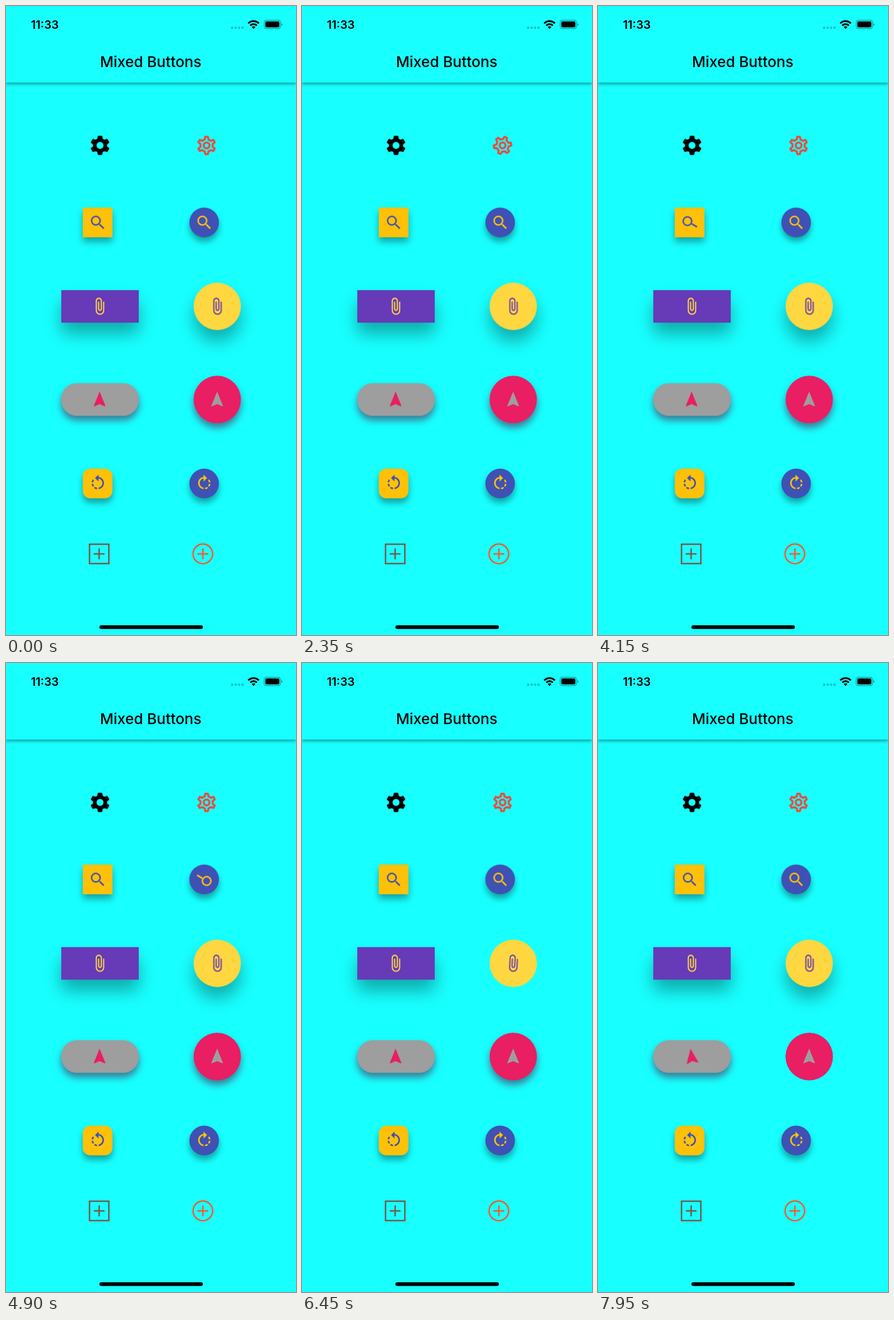
An HTML page that plays this animation: 509 px wide and 1101 px high, repeating every 8000 ms.

```html
<!DOCTYPE html>
<html lang="en">
<head>
<meta charset="utf-8">
<title>Mixed Buttons</title>
<style>
  html, body { margin: 0; width: 100%; height: 100%; overflow: hidden; background: #18ffff; }
  .stage { position: relative; width: 509px; height: 1101px; overflow: hidden; }
  .bar { position: absolute; inset: 0 0 auto; height: 134px; background: #18ffff; box-shadow: 0 3px 5px rgba(0, 0, 0, .36); }
  .chrome { position: absolute; inset: 0; font-family: Inter, Roboto, sans-serif; }

  /* --x and --y are the button centre */
  .btn {
    position: absolute; display: grid; place-items: center;
    left: calc(var(--x) * 1px); top: calc(var(--y) * 1px);
    width: var(--w); height: var(--h, var(--w));
    transform: translate(-50%, -50%);
    background: var(--bg, none); color: var(--fg);
  }
  .btn svg { width: var(--icon, 32.57px); height: var(--icon, 32.57px); overflow: visible; fill: currentColor; }
  .gear { --w: 40.7px; --icon: 40.7px; }
  .small { --w: 52.4px; }
  .disc { --w: 83.4px; }
  .wide { --w: 136px; --h: 57.4px; }
  .round { border-radius: 50%; }
  .low { --shade: rgba(0, 0, 0, .36); box-shadow: 0 8px 12px var(--shade); }
  .mid { --shade: rgba(85, 15, 65, .55); box-shadow: 0 8px 13px var(--shade); }
  .high { --shade: rgba(0, 0, 0, .33); box-shadow: 0 20px 30px var(--shade); }

  .press { animation: press 8s var(--down) infinite cubic-bezier(.4, 0, .2, 1); }
  .hold { animation: hold 8s infinite cubic-bezier(.4, 0, .2, 1); }
  .spin { animation: spin 8s var(--go) infinite ease-in-out; }
  @keyframes press {
    3%, 6.15% { box-shadow: 0 0 0 var(--shade); }
    8.9% { box-shadow: revert-layer; }
  }
  .low.press { animation-name: press-low; }
  .mid.press { animation-name: press-mid; }
  .high.press { animation-name: press-high; }
  @keyframes press-low {
    0%, 8.9%, 100% { box-shadow: 0 8px 12px var(--shade); }
    3%, 6.15% { box-shadow: 0 0 0 var(--shade); }
  }
  @keyframes press-mid {
    0%, 8.9%, 100% { box-shadow: 0 8px 13px var(--shade); }
    3%, 6.15% { box-shadow: 0 0 0 var(--shade); }
  }
  @keyframes press-high {
    0%, 8.9%, 100% { box-shadow: 0 20px 30px var(--shade); }
    3%, 6.15% { box-shadow: 0 0 0 var(--shade); }
  }
  @keyframes hold {
    0%, 97% { box-shadow: 0 8px 13px var(--shade); }
    100% { box-shadow: 0 0 0 var(--shade); }
  }
  @keyframes spin {
    0% { transform: rotate(0); }
    8.125%, 100% { transform: rotate(360deg); }
  }
</style>
</head>
<body>
<svg width="0" height="0" style="position:absolute">
  <defs>
    <path id="cog" stroke="currentColor" stroke-width="2" stroke-linejoin="round" d="M-1.85-6.25L-1.45-9H1.45L1.85-6.25 4.49-4.73 7.07-5.76 8.52-3.24 6.34-1.52V1.52L8.52 3.24 7.07 5.76 4.49 4.73 1.85 6.25 1.45 9H-1.45L-1.85 6.25-4.49 4.73-7.07 5.76-8.52 3.24-6.34 1.52V-1.52L-8.52-3.24-7.07-5.76-4.49-4.73z"/>
    <symbol id="search" viewBox="0 0 24 24"><path d="M15.5 14h-.79l-.28-.27A6.471 6.471 0 0 0 16 9.5 6.5 6.5 0 1 0 9.5 16c1.61 0 3.09-.59 4.23-1.57l.27.28v.79l5 4.99L20.49 19l-4.99-5zm-6 0C7.01 14 5 11.99 5 9.5S7.01 5 9.5 5 14 7.01 14 9.5 11.99 14 9.5 14z"/></symbol>
    <symbol id="clip" viewBox="0 0 24 24"><path d="M16.5 6v11.5c0 2.21-1.79 4-4 4s-4-1.79-4-4V5c0-1.38 1.12-2.5 2.5-2.5s2.5 1.12 2.5 2.5v10.5c0 .55-.45 1-1 1s-1-.45-1-1V6H10v9.5c0 1.38 1.12 2.5 2.5 2.5s2.5-1.12 2.5-2.5V5c0-2.21-1.79-4-4-4S7 2.79 7 5v12.5c0 3.04 2.46 5.5 5.5 5.5s5.5-2.46 5.5-5.5V6z"/></symbol>
    <symbol id="arrow" viewBox="0 0 24 24"><path d="M12 2L4.5 20.29l.71.71L12 18l6.79 3 .71-.71z"/></symbol>
    <symbol id="turn" viewBox="0 0 24 24"><path d="M7.11 8.53L5.7 7.11C4.8 8.27 4.24 9.61 4.07 11h2.02c.14-.87.49-1.72 1.02-2.47zM6.09 13H4.07c.17 1.39.72 2.73 1.62 3.89l1.41-1.42c-.52-.75-.87-1.59-1.01-2.47zm1.01 5.32c1.16.9 2.51 1.44 3.9 1.61V17.9c-.87-.15-1.71-.49-2.46-1.03L7.1 18.32zM13 4.07V1L8.45 5.55 13 10V6.09c2.84.48 5 2.94 5 5.91s-2.16 5.43-5 5.91v2.02c3.95-.49 7-3.85 7-7.93s-3.05-7.44-7-7.93z"/></symbol>
    <mask id="hub"><rect x="-12" y="-12" width="24" height="24" fill="#fff"/><circle r="3.6"/></mask>
  </defs>
</svg>

<div class="stage">
  <div class="bar"></div>

  <div class="btn gear" style="--x:165;--y:243.5;--fg:#000;--go:1390ms">
    <svg class="spin" viewBox="-12 -12 24 24"><use href="#cog" mask="url(#hub)"/></svg>
  </div>
  <div class="btn gear" style="--x:352;--y:243.5;--fg:#f44336;--go:2240ms">
    <svg class="spin" viewBox="-12 -12 24 24" style="fill:none"><use href="#cog"/><circle r="3" stroke="currentColor" stroke-width="2"/></svg>
  </div>

  <div class="btn small low press" style="--x:160.8;--y:379;--bg:#ffc107;--fg:#3f51b5;--down:3130ms;--go:3590ms">
    <svg class="spin"><use href="#search"/></svg>
  </div>
  <div class="btn small round low press" style="--x:348;--y:379;--bg:#3f51b5;--fg:#ffc107;--down:4110ms;--go:4590ms">
    <svg class="spin"><use href="#search"/></svg>
  </div>

  <div class="btn wide high press" style="--x:164.5;--y:526;--bg:#673ab7;--fg:#ffd740;--down:5060ms;--go:5505ms">
    <svg class="spin"><use href="#clip"/></svg>
  </div>
  <div class="btn disc round high press" style="--x:370.8;--y:526;--bg:#ffd740;--fg:#673ab7;--down:5960ms;--go:6405ms">
    <svg class="spin"><use href="#clip"/></svg>
  </div>

  <div class="btn wide mid press" style="--x:164.5;--y:688.5;--bg:#9e9e9e;--fg:#e91e63;--down:6940ms;--go:7370ms;border-radius:27px">
    <svg class="spin"><use href="#arrow"/></svg>
  </div>
  <div class="btn disc round mid hold" style="--x:370.8;--y:688.5;--bg:#e91e63;--fg:#9e9e9e">
    <svg><use href="#arrow"/></svg>
  </div>

  <div class="btn small low" style="--x:160.8;--y:835.5;--bg:#ffc107;--fg:#3f51b5;border-radius:13px">
    <svg><use href="#turn"/></svg>
  </div>
  <div class="btn small round low" style="--x:348;--y:835.5;--bg:#3f51b5;--fg:#ffc107">
    <svg style="transform:scaleX(-1)"><use href="#turn"/></svg>
  </div>

  <svg class="chrome" width="509" height="1101" viewBox="0 0 509 1101">
    <text x="68" y="40" font-size="20" font-weight="600" text-anchor="middle">11:33</text>
    <text x="254" y="107" font-size="26" font-weight="500" text-anchor="middle">Mixed Buttons</text>
    <g fill="#000" fill-opacity=".22">
      <circle cx="397" cy="38" r="2.2"/><circle cx="403.2" cy="38" r="2.2"/>
      <circle cx="409.2" cy="38" r="2.2"/><circle cx="415.2" cy="38" r="2.2"/>
    </g>
    <g fill="none" stroke="#000" stroke-width="3">
      <path d="M425.1 30.4A13 13 0 0 1 443.9 30.4M428.7 34.3A8 8 0 0 1 440.3 34.3"/>
    </g>
    <path d="M434.5 40.2l-3.2-3.3a4.5 4.5 0 0 1 6.4 0z"/>
    <rect x="453.2" y="25" width="28.6" height="14.6" rx="4" fill="none" stroke="#000" stroke-opacity=".4" stroke-width="1.3"/>
    <rect x="455.2" y="27" width="24.6" height="10.6" rx="2.4"/>
    <path d="M483.3 30a2.6 2.6 0 0 1 0 4.8z" fill-opacity=".45"/>

    <g fill="none" stroke-width="2.5">
      <g stroke="#795548"><rect x="146.6" y="942.1" width="33.9" height="33.9"/><path d="M154 959h19M163.5 949.5v19"/></g>
      <g stroke="#ff5722"><circle cx="345.5" cy="959" r="17.2"/><path d="M336 959h19M345.5 949.5v19"/></g>
    </g>
    <rect x="164" y="1084" width="181.5" height="6.6" rx="3.3"/>
  </svg>
</div>
</body>
</html>
```
